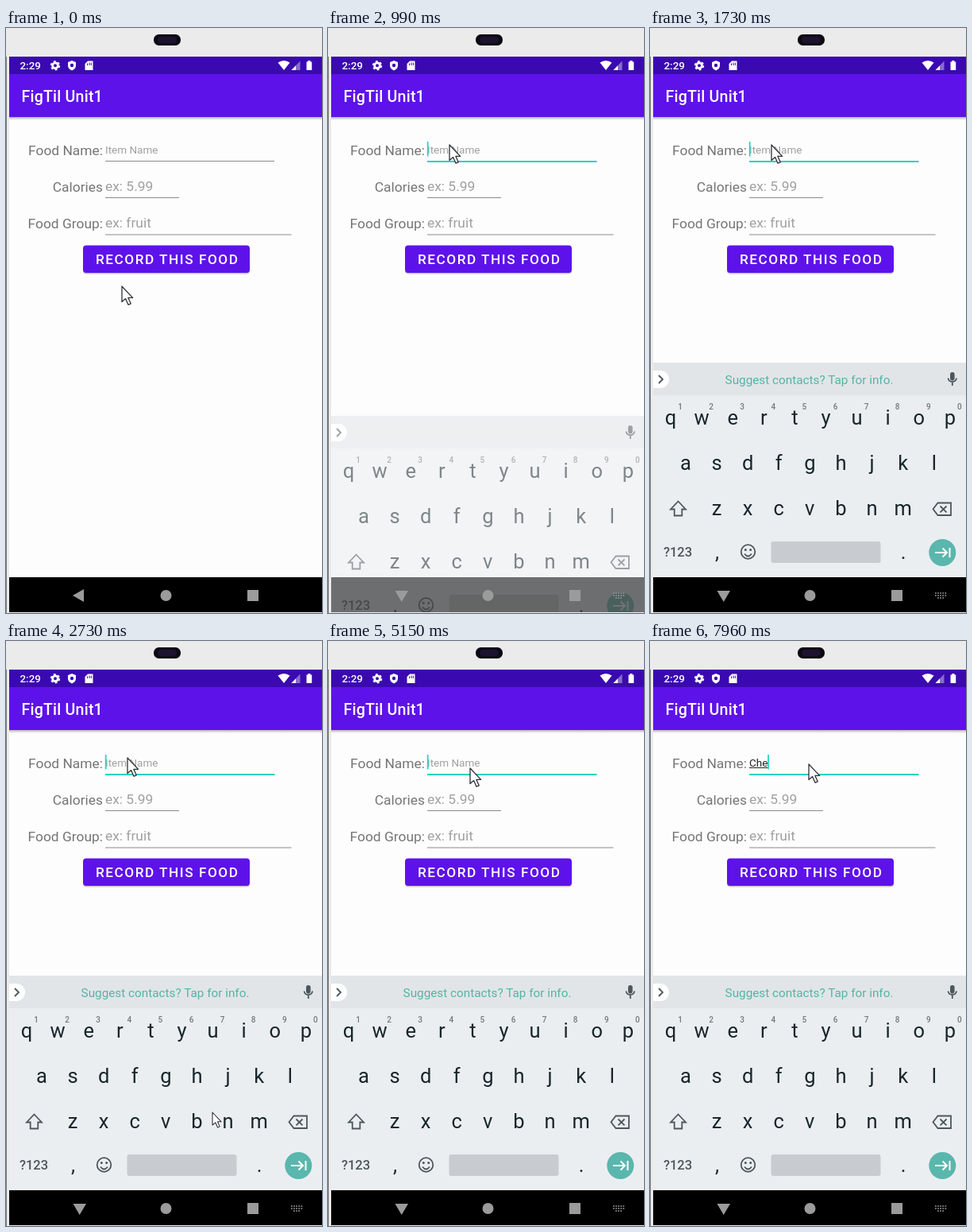
An HTML page for the animation above (8 s loop, 398x736 px).

```html
<!DOCTYPE html>
<html lang="en">
<head>
<meta charset="utf-8">
<style>
  html, body { margin: 0; width: 100%; height: 100%; overflow: hidden; background: #ebebec; }
  svg { display: block; width: 398px; height: 736px; }
  text { font-family: Roboto, sans-serif; white-space: pre; }
  .medium { font-weight: 500; }
  .label { font-size: 17.4px; fill: #757575; text-anchor: end; }
  .hint { font-size: 17.4px; fill: #a0a0a0; }
  .small { font-size: 13.5px; }
  .key { font-size: 25.5px; fill: #18262c; text-anchor: middle; }
  .digit { font-size: 10px; font-weight: 500; fill: #707a7f; text-anchor: middle; }
  .icon { fill: none; stroke: #4c575d; stroke-width: 1.8; }
  .pointer { fill: #fff; stroke: #30323a; stroke-width: 1.3; stroke-linejoin: round; }
</style>
</head>
<body>
<svg viewBox="0 0 398 736">
  <defs>
    <clipPath id="screen"><rect x="4" y="36" width="394" height="699"/></clipPath>
    <linearGradient id="shade" x2="0" y2="1">
      <stop stop-color="#000" stop-opacity=".28"/><stop offset="1" stop-color="#000" stop-opacity="0"/>
    </linearGradient>
    <path id="arrow" d="M0 0V19.5L4.6 15.6L8 23.2L11.2 21.8L7.9 14.4H13.6Z"/>
  </defs>

  <!-- device -->
  <rect width="398" height="736" fill="#ebebec"/>
  <rect y="36" width="1" height="700" fill="#777"/>
  <rect x="186" y="8" width="34" height="14" rx="6.5" fill="#0b0910"/>
  <rect x="191" y="11" width="24" height="8" rx="4" fill="#1d1230"/>

  <g clip-path="url(#screen)">
    <rect x="4" y="36" width="394" height="700" fill="#fdfdfd"/>

    <!-- status bar -->
    <rect x="4" y="36" width="394" height="22" fill="#3a0ab0"/>
    <text class="medium" x="17.5" y="52" font-size="13.4" fill="#fff">2:29</text>
    <g fill="#fff">
      <circle cx="62" cy="47.3" r="3.4" fill="none" stroke="#fff" stroke-width="2.8"/>
      <circle cx="62" cy="47.3" r="5.3" fill="none" stroke="#fff" stroke-width="1.8" stroke-dasharray="2.8 2.75"/>
      <path d="M83 41L88 43V47Q88 51.5 83 53.5Q78 51.5 78 47V43Z"/>
      <circle cx="83" cy="47" r="2.2" fill="#3a0ab0"/>
      <path d="M103 41.5H109.5V53H99.5V45Z"/>
      <path d="M102.5 44.5V47M105 43.5V47M107.3 43.5V47" stroke="#3a0ab0"/>
      <path d="M342.5 43.5Q350 38.5 357.5 43.5L350 53Z"/>
      <path d="M370.5 41.5V53H359.5Z" opacity=".4"/>
      <path d="M365 47.2V53H359.5Z"/>
      <path d="M378.5 42.5H380.3V41H383.4V42.5H385.2V53H378.5Z"/>
    </g>

    <!-- app bar -->
    <rect x="4" y="58" width="394" height="54" fill="#5e12ea"/>
    <rect x="4" y="112" width="394" height="4" fill="url(#shade)"/>
    <text class="medium" x="19.5" y="93" font-size="19.6" letter-spacing=".2" fill="#fff">FigTil Unit1</text>

    <!-- form -->
    <text class="label" x="122" y="159.5">Food Name:</text>
    <text class="label" x="122" y="205.5">Calories</text>
    <text class="label" x="122" y="251.5">Food Group:</text>
    <text class="hint small" id="hint" x="125" y="157.5">Item Name</text>
    <text class="hint" x="125" y="205">ex: 5.99</text>
    <text class="hint" x="125" y="251">ex: fruit</text>
    <g fill="#8b8b8b">
      <rect id="idle" x="125" y="167" width="213" height="1"/>
      <rect x="125" y="213" width="93" height="1"/>
      <rect x="125" y="259.5" width="234.500" height="1"/>
    </g>
    <rect id="focus" x="125" y="167" width="213.500" height="2" fill="#1bd5c0"/>
    <text class="small" id="typed" x="125" y="157.5" fill="#222"></text>
    <rect id="under" x="125" y="159" height="1" fill="#222"/>
    <rect id="caret" y="143" width="1.700" height="18.500" fill="#1bd5c0"/>

    <rect x="97" y="275.500" width="210" height="34" rx="4" fill="#000" opacity=".22"/>
    <rect x="97" y="273.500" width="210" height="34.500" rx="4" fill="#5e12ea"/>
    <text class="medium" x="113" y="297" font-size="17.2" letter-spacing="1.54" fill="#fff">RECORD THIS FOOD</text>

    <!-- keyboard -->
    <g id="board">
      <rect x="4" y="421" width="394" height="42" fill="#e1e5e8"/>
      <rect x="4" y="462" width="394" height="274" fill="#ebeef1"/>
      <path d="M4 431H13A10.500 10.500 0 0 1 13 453H4Z" fill="#fff"/>
      <path class="icon" d="M11 437L16 442L11 447"/>
      <text id="tip" x="200.5" y="448" font-size="15.3" fill="#53b5a5" text-anchor="middle">Suggest contacts? Tap for info.</text>
      <rect x="378" y="433" width="5.600" height="10.500" rx="2.800" fill="#4c575d"/>
      <path class="icon" d="M375.500 440.500A5.300 5.300 0 0 0 386 440.500M380.800 446V450"/>
      <g id="keys"></g>
      <path class="icon" d="M35.500 595.500L45 605.500H40.300V613.500H30.700V605.500H26Z"/>
      <path class="icon" d="M362.500 597.500H379V613H362.500L356.500 605.200ZM365.500 601.500L373.500 609.300M373.500 601.500L365.500 609.300"/>
      <text class="medium" x="35" y="665" font-size="16.5" fill="#4c575d" text-anchor="middle">?123</text>
      <circle class="icon" cx="123.500" cy="659" r="8.800"/>
      <path class="icon" d="M119 661.500Q123.500 667.500 128 661.500"/>
      <circle cx="120.300" cy="656.500" r="1.500" fill="#4c575d"/>
      <circle cx="126.700" cy="656.500" r="1.500" fill="#4c575d"/>
      <rect x="152.500" y="646" width="138" height="27" rx="3" fill="#c8ccd0"/>
      <circle cx="368.300" cy="660" r="17" fill="#5ab7ad"/>
      <path d="M359 660H373.500M368.500 654.500L374 660L368.500 665.500M377.500 654V666" fill="none" stroke="#fff" stroke-width="2"/>
    </g>

    <!-- navigation bar -->
    <rect id="nav" x="4" y="691" width="394" height="45"/>
    <g fill="#9b9b9b">
      <path id="back" d="M84 714L98 706V722Z"/>
      <path id="down" d="M84.500 708H101L92.700 722Z"/>
      <circle cx="201.500" cy="714" r="7"/>
      <rect x="304" y="707" width="14" height="14"/>
      <path id="switch" d="M359 711H374M359 714H374M362 717H371" fill="none" stroke="#9b9b9b" stroke-width="1.6" stroke-dasharray="1.8 1.3"/>
    </g>
  </g>

  <use class="pointer" id="mouse" href="#arrow"/>
  <use class="pointer" id="second" href="#arrow"/>
</svg>
<script>
  const LOOP = 8000, PITCH = 39.1;
  const el = id => document.getElementById(id);
  const show = (id, on) => el(id).style.opacity = +on;

  const row = (chars, x, y, type = "key") => [...chars].map((c, i) =>
    `<text class="${type}" x="${x + i * PITCH}" y="${y}">${c}</text>`).join("");
  el("keys").innerHTML = row("qwertyuiop", 26, 499) + row("1234567890", 38, 480, "digit") +
    row("asdfghjkl", 45, 556) + row("zxcvbnm", 84, 613) + row(",", 84.5, 668) + row(".", 319, 668);

  // [start time, x, y]
  const mousePath = [
    [0, 146, 325], [120, 146, 280], [270, 148, 197], [420, 152, 161], [570, 153, 147],
    [4320, 157, 147], [4630, 167, 147], [4780, 173, 150], [4900, 178, 154],
    [5150, 179, 160], [5300, 192, 163], [5420, 201, 165], [5970, 200, 155]
  ];
  const secondPath = [[2490, 260, 593], [2980, 262, 590], [3230, 264, 586]];
  const blinks = [840, 1270, 1730, 2340, 2730, 3230, 3790, 4320, 4780, 5300, 5690, 6250, 6690];
  const strokes = [7130, 7380, 7960];

  const countUntil = (times, t) => times.filter(s => s <= t).length;

  function place(id, path, t, scale) {
    const spot = path.filter(p => p[0] <= t).pop();
    if (spot) el(id).setAttribute("transform", `translate(${spot[1]} ${spot[2]}) scale(${scale})`);
  }

  function draw(t) {
    place("mouse", mousePath, t, 1);
    place("second", secondPath, t, 0.82);
    show("second", t >= 2490 && t < 4780);

    const typed = "Che".slice(0, countUntil(strokes, t));
    el("typed").textContent = typed;
    const width = typed ? el("typed").getComputedTextLength() : 0;
    el("under").setAttribute("width", width);
    el("caret").setAttribute("x", 124.8 + width);
    show("caret", countUntil(blinks, t) % 2);
    show("hint", !typed);
    show("focus", t < 720 ? 0 : t < 840 ? 0.5 : 1);
    show("idle", t < 840);

    const open = t >= 990, settled = t >= 1140;
    show("board", open ? (settled ? 1 : 0.55) : 0);
    el("board").setAttribute("transform", `translate(0 ${settled ? 0 : 67})`);
    show("tip", settled);
    show("nav", open && !settled ? 0.55 : 1);
    show("back", !open);
    show("down", open);
    show("switch", open);
  }

  function frame(now) {
    draw(now % LOOP);
    requestAnimationFrame(frame);
  }
  draw(0);
  requestAnimationFrame(frame);
</script>
</body>
</html>
```
